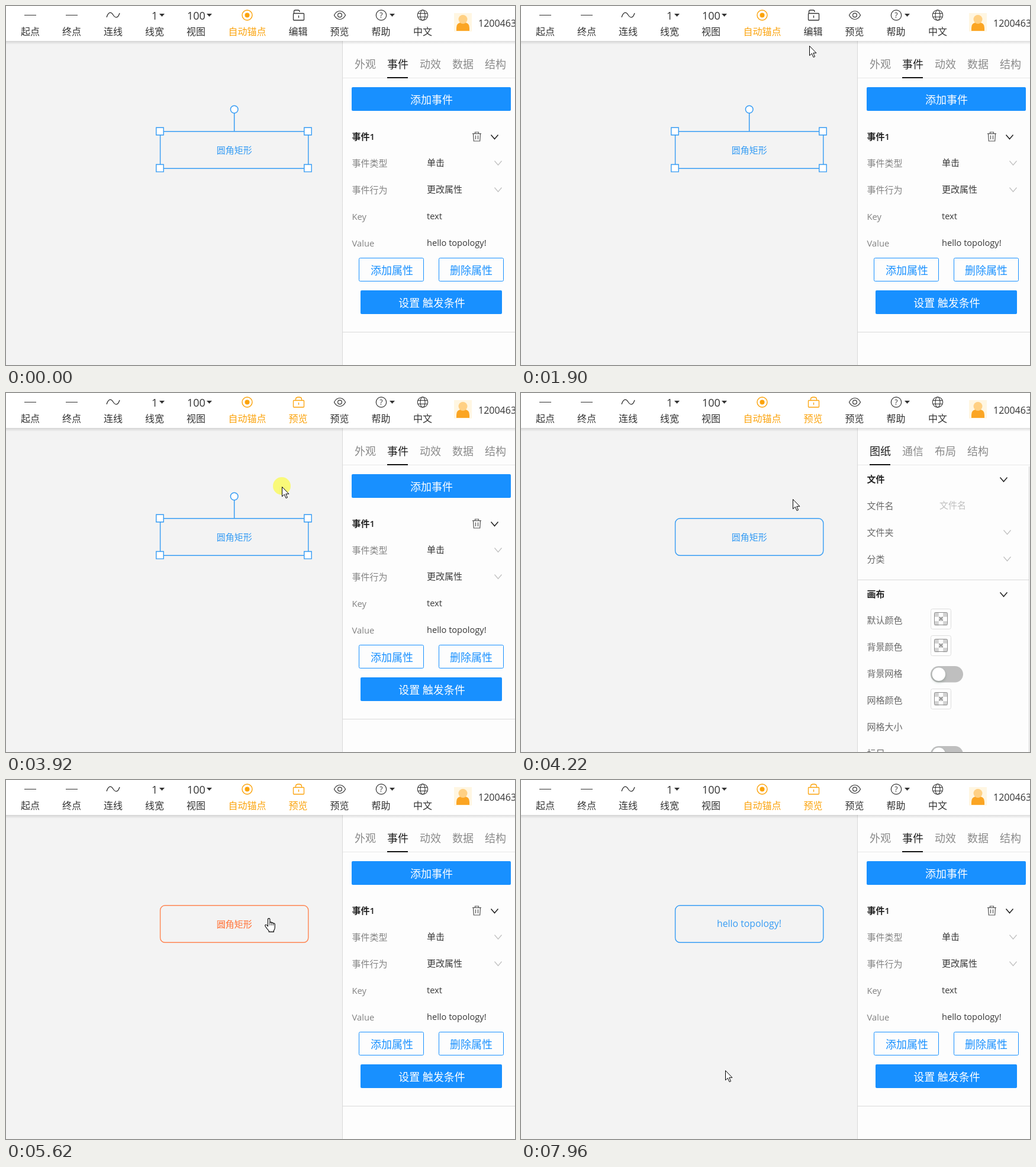
These frames come from a looping animation (860 by 606 pixels, 8 s). An HTML page with a canvas:

```html
<!DOCTYPE html>
<html lang="zh-CN">
<head>
<meta charset="utf-8">
<title>事件</title>
<style>
html, body { margin: 0; width: 100%; height: 100%; overflow: hidden; background: #f3f3f3; }
canvas { display: block; }
</style>
</head>
<body>
<canvas id="stage" width="860" height="606"></canvas>
<script>
const ctx = document.getElementById('stage').getContext('2d');
const LOOP = 8000;
const FONT = '"Open Sans", "Noto Sans CJK SC", "Noto Sans CJK", sans-serif';
const INK = '#333', GOLD = '#fba30c', BLUE = '#1890ff', LINE = '#d9d9d9';
const SHAPE = '#369cf4', HOVER = '#ff8552';

// Bursts of pointer activity: start, end, number of steps
const bursts = [
  [690, 1440, 11], [1610, 2140, 8], [2370, 2440, 2], [2920, 3610, 10],
  [3920, 4610, 10], [5310, 5690, 6], [7020, 7800, 11], [7880, 7960, 2]
];

// Pointer path: time, x, y
const path = [
  [690, 771, 590], [840, 672, 415], [990, 585, 285], [1210, 504, 161], [1440, 479, 109],
  [1610, 480, 107], [1840, 487, 66], [2140, 496, 26],
  [2850, 496, 26], [2920, 498, 32], [3060, 503, 75], [3200, 495, 150], [3340, 480, 178], [3610, 466, 158],
  [4080, 466, 158], [4300, 456, 190], [4610, 444, 233],
  [6950, 444, 233], [7020, 440, 236], [7300, 432, 246], [7560, 412, 278], [7800, 384, 356],
  [7880, 366, 420], [7960, 345, 490]
];

// Button presses: start, end, x, y
const presses = [[2370, 2440, 496, 27], [3920, 4060, 466, 157], [5310, 5450, 443, 234]];

function snap(t) {
  let at = 0;
  for (const [start, end, n] of bursts) {
    if (t < start) break;
    const step = (end - start) / (n - 1);
    at = start + Math.min(n - 1, Math.floor((t - start) / step + 0.1)) * step;
  }
  return at;
}

function pointerAt(t) {
  if (t < path[0][0]) return null;
  let i = 0;
  while (i < path.length - 2 && path[i + 1][0] <= t) i++;
  const [t0, x0, y0] = path[i], [t1, x1, y1] = path[i + 1];
  const p = Math.min(1, (t - t0) / (t1 - t0));
  return { x: Math.round(x0 + (x1 - x0) * p), y: Math.round(y0 + (y1 - y0) * p) };
}

function text(str, x, y, size, color, align = 'left', weight = 400) {
  ctx.font = `${weight} ${size}px ${FONT}`;
  ctx.textAlign = align;
  ctx.fillStyle = color;
  ctx.fillText(str, x, y);
}

// Places text by the vertical middle of its Chinese glyphs
function mid(str, x, y, size, color, align, weight) {
  text(str, x, y + size * 0.38, size, color, align, weight);
}

function fill(x, y, w, h, color, r = 0) {
  ctx.fillStyle = color;
  ctx.beginPath();
  ctx.roundRect(x, y, w, h, r);
  ctx.fill();
}

function box(x, y, w, h, color, r = 0, width = 1) {
  ctx.strokeStyle = color;
  ctx.lineWidth = width;
  ctx.beginPath();
  ctx.roundRect(x, y, w, h, r);
  ctx.stroke();
}

function line(color, width, ...pts) {
  ctx.strokeStyle = color;
  ctx.lineWidth = width;
  ctx.beginPath();
  for (let i = 0; i < pts.length; i += 2) ctx.lineTo(pts[i], pts[i + 1]);
  ctx.stroke();
}

function svg(d, stroke, width = 1.2, paint) {
  const p = new Path2D(d);
  if (paint) { ctx.fillStyle = paint; ctx.fill(p); }
  if (stroke) { ctx.strokeStyle = stroke; ctx.lineWidth = width; ctx.stroke(p); }
}

function disc(x, y, r, paint, stroke, width = 1.2) {
  ctx.beginPath();
  ctx.arc(x, y, r, 0, Math.PI * 2);
  if (paint) { ctx.fillStyle = paint; ctx.fill(); }
  if (stroke) { ctx.strokeStyle = stroke; ctx.lineWidth = width; ctx.stroke(); }
}

function chevron(x, y, dark) {
  line(dark ? '#222' : '#bfbfbf', dark ? 1.5 : 1.2, x - 6, y - 3.5, x, y + 3.5, x + 6, y - 3.5);
}

function caret(x) {
  svg(`M${x - 4.5} 13h9l-4.5 5z`, null, 0, INK);
}

function lock(color, closed) {
  box(485.5, 12.5, 18, 11.5, color, 1, 1.3);
  svg(closed ? 'M489.5 12V10.5Q489.5 7 494.5 7T499.5 10.5V12'
             : 'M486.5 12V9.5Q486.5 7 489 7H493.5Q496 7 496 9.5V10', color, 1.3);
  line(color, 1.3, 494.5, 16, 494.5, 20);
}

function avatar() {
  fill(757, 12, 30, 31, '#fff6e2');
  svg('M761 42V37Q761 29 768 28H776Q783 29 783 37V42z', null, 0, '#fba523');
  disc(772, 22.5, 7.5, '#ffd083');
}

function header(hot, closed) {
  const shade = ctx.createLinearGradient(0, 59, 0, 65);
  shade.addColorStop(0, 'rgba(0,0,0,.13)');
  shade.addColorStop(1, 'rgba(0,0,0,0)');
  ctx.fillStyle = shade;
  ctx.fillRect(0, 59, 860, 6);
  fill(0, 0, 860, 59, '#fff');

  const labels = [['起点', 41], ['终点', 111], ['连线', 181], ['线宽', 251], ['视图', 321],
    ['预览', 563.5], ['帮助', 633.5], ['中文', 704]];
  for (const [s, x] of labels) mid(s, x, 42.5, 16, INK, 'center');
  mid('自动锚点', 407.5, 42.5, 16, GOLD, 'center');
  mid(closed ? '预览' : '编辑', 493.5, 42.5, 16, hot ? GOLD : INK, 'center');

  line(INK, 1, 31, 15.5, 51, 15.5);
  line(INK, 1, 101, 15.5, 121, 15.5);
  svg('M170 19C173 10 177 9 181 15S189 21 192 12', INK, 1.3);
  text('1', 246, 22.5, 18, INK);
  text('100', 306, 22.5, 18, INK);
  [263.5, 343.5, 652.5].forEach(caret);

  disc(407.5, 15.5, 8.5, null, GOLD, 1.4);
  disc(407.5, 15.5, 4, GOLD);
  lock(hot ? GOLD : INK, closed);
  svg('M554.5 15.5Q558 8.5 564 8.5T573.5 15.5Q570 22.5 564 22.5T554.5 15.5z', INK);
  disc(564, 15.5, 3.4, null, INK);
  disc(634, 15.5, 8.7, null, INK);
  text('?', 634, 20, 12.5, INK, 'center');
  disc(704, 15.5, 8.7, null, INK, 1.1);
  ctx.beginPath();
  ctx.ellipse(704, 15.5, 4, 8.7, 0, 0, Math.PI * 2);
  ctx.stroke();
  line(INK, 1, 696, 12.5, 712, 12.5);
  line(INK, 1, 696, 18.5, 712, 18.5);
  avatar();
  text('1200463', 798, 34.5, 16, INK);
}

function tabs(names, active) {
  names.forEach((s, i) => mid(s, 589 + i * 55, 98.5, 18, i === active ? '#1f1f1f' : '#8a8a8a'));
  line('#e8e8e8', 1, 569, 121.5, 860, 121.5);
  fill(589 + active * 55, 120, 35, 2, '#111');
}

function eventPanel() {
  tabs(['外观', '事件', '动效', '数据', '结构'], 1);
  fill(584, 137, 269, 40, BLUE, 2);
  mid('添加事件', 719, 158.5, 18, '#fff', 'center');

  mid('事件1', 584.5, 220.5, 15, '#222', 'left', 600);
  line('#555', 1.2, 788, 215.5, 803, 215.5);
  svg('M792.5 215.5V213H798.5V215.5M789.5 216L790.3 228H800.7L801.5 216' +
    'M793.5 218.5V225M797.5 218.5V225', '#555');
  chevron(825.5, 221, true);

  const gray = '#828282', dark = '#383838';
  mid('事件类型', 584.5, 265.5, 15, gray);
  mid('单击', 711, 264.5, 15, dark);
  chevron(831.5, 265, false);
  mid('事件行为', 584.5, 310.5, 15, gray);
  mid('更改属性', 711, 309.5, 15, dark);
  chevron(831.5, 310, false);
  text('Key', 584.5, 361, 14.8, gray);
  text('text', 711, 360, 14.6, dark);
  text('Value', 584.5, 406, 14.8, gray);
  text('hello topology!', 711, 405, 14.6, dark);

  box(596.5, 425.5, 109, 39, BLUE, 2);
  mid('添加属性', 652, 446, 18, BLUE, 'center');
  box(731.5, 425.5, 109, 39, BLUE, 2);
  mid('删除属性', 786, 446, 18, BLUE, 'center');
  fill(599, 480, 239, 40, BLUE, 2);
  mid('设置 触发条件', 719.5, 501, 18, '#fff', 'center');
  line(LINE, 1, 569, 550.5, 860, 550.5);
}

function swatch(y) {
  box(692.5, y + 0.5, 34, 34, '#dedede', 3);
  const x = 698.5, top = y + 6.5, c = 22 / 3;
  for (let i = 0; i < 9; i += 2) {
    fill(x + (i % 3) * c, top + Math.floor(i / 3) * c, c, c, '#d2d2d2');
  }
  box(x, top, 22, 21, '#8c8c8c', 2);
  line('#888', 1.1, 706.5, y + 14, 712.5, y + 20);
  line('#888', 1.1, 712.5, y + 14, 706.5, y + 20);
}

function toggle(y) {
  fill(692, y, 55, 27.5, '#bfbfbf', 13.75);
  ctx.save();
  ctx.shadowColor = 'rgba(0,35,11,.2)';
  ctx.shadowBlur = 5;
  ctx.shadowOffsetY = 2.5;
  disc(705.8, y + 13.75, 11.25, '#fff');
  ctx.restore();
}

function drawingPanel() {
  const gray = '#686868';
  tabs(['图纸', '通信', '布局', '结构'], 0);
  mid('文件', 584.5, 145.5, 15, '#222', 'left', 600);
  chevron(815.5, 146, true);
  mid('文件名', 584.5, 190.5, 15, gray);
  mid('文件名', 707, 189.5, 15, '#bfbfbf');
  mid('文件夹', 584.5, 235.5, 15, gray);
  chevron(821.5, 235, false);
  mid('分类', 584.5, 280.5, 15, gray);
  chevron(821.5, 280, false);
  line(LINE, 1, 569, 315.5, 858, 315.5);
  mid('画布', 584.5, 339.5, 15, '#222', 'left', 600);
  chevron(815.5, 340, true);
  ['默认颜色', '背景颜色', '背景网格', '网格颜色', '网格大小', '标尺'].forEach((s, i) =>
    mid(s, 584.5, 383.5 + i * 45, 15, gray));
  [364, 409, 499].forEach(swatch);
  toggle(461);
  toggle(596);
  fill(858, 124, 1, 482, '#cfcfcf');
}

function node(selected, hover, label) {
  const color = hover ? HOVER : SHAPE;
  box(260.6, 211.8, 250.2, 62.5, color, selected ? 0 : 8, 1.4);
  // The hovered label is painted over itself, which thickens its edges
  for (let pass = hover ? 2 : 1; pass > 0; pass--) {
    if (label) text(label, 385.5, 248, 15.8, color, 'center');
    else mid('圆角矩形', 385.7, 243, 15, color, 'center');
  }
  if (!selected) return;
  line(color, 1.5, 385.7, 181, 385.7, 211);
  disc(385.7, 174.5, 6.3, '#fff', color, 1.5);
  for (const x of [260, 510]) for (const y of [211.5, 273.7]) {
    fill(x - 6.2, y - 6.2, 12.4, 12.4, '#fff');
    box(x - 6.2, y - 6.2, 12.4, 12.4, color, 0, 1.4);
  }
}

function pointer({ x, y }, hand) {
  ctx.save();
  ctx.lineJoin = 'round';
  if (hand) {
    ctx.translate(x - 7, y);
    svg('M5.5 14V2.2Q5.5 .6 7.2 .6T8.9 2.2V8Q9.2 6.7 10.5 6.9T12 8.4Q12.3 7.4 13.4 7.7T14.8 9.3' +
      'Q15.2 8.5 16.2 8.9T17.3 10.6V16Q17.3 19 15.4 21V23.4H7.2V21.6Q4 18.5 1.2 14' +
      'Q.2 12 1.6 11.4T5.5 14z', '#000', 1.1, '#fff');
    svg('M8.9 8V12.5M12 8.5V12.5M14.8 9.5V12.5', '#000', 0.9);
  } else {
    ctx.translate(x + 0.5, y + 0.5);
    svg('M0 0V16.2L3.8 12.7 6.6 19 9 18 6.3 11.8H11.4z', '#000', 1, '#fff');
  }
  ctx.restore();
}

function draw(t) {
  const cursor = pointerAt(snap(t));
  const inBox = (x0, y0, x1, y1) =>
    !!cursor && cursor.x > x0 && cursor.x < x1 && cursor.y > y0 && cursor.y < y1;
  const overEdit = inBox(470, 0, 520, 57);
  const overNode = t > 3990 && inBox(260, 211, 511, 275);
  const closed = t >= 2440;

  ctx.fillStyle = '#f3f3f3';
  ctx.fillRect(0, 0, 860, 606);
  fill(569, 59, 291, 547, '#fdfdfd');
  line(LINE, 1, 568.5, 59, 568.5, 606);
  if (t >= 3990 && t < 5380) drawingPanel();
  else eventPanel();
  header(overEdit || closed, closed);
  node(t < 3990, overNode, t >= 7020 ? 'hello topology!' : '');

  for (const [start, end, x, y] of presses) {
    if (t >= start && t < end) disc(x, y, 15, 'rgba(255,255,0,.5)');
  }
  if (cursor) pointer(cursor, overEdit || overNode);
}

let began;
function tick(now) {
  began ??= now;
  draw((now - began) % LOOP);
  requestAnimationFrame(tick);
}
requestAnimationFrame(tick);
</script>
</body>
</html>
```
